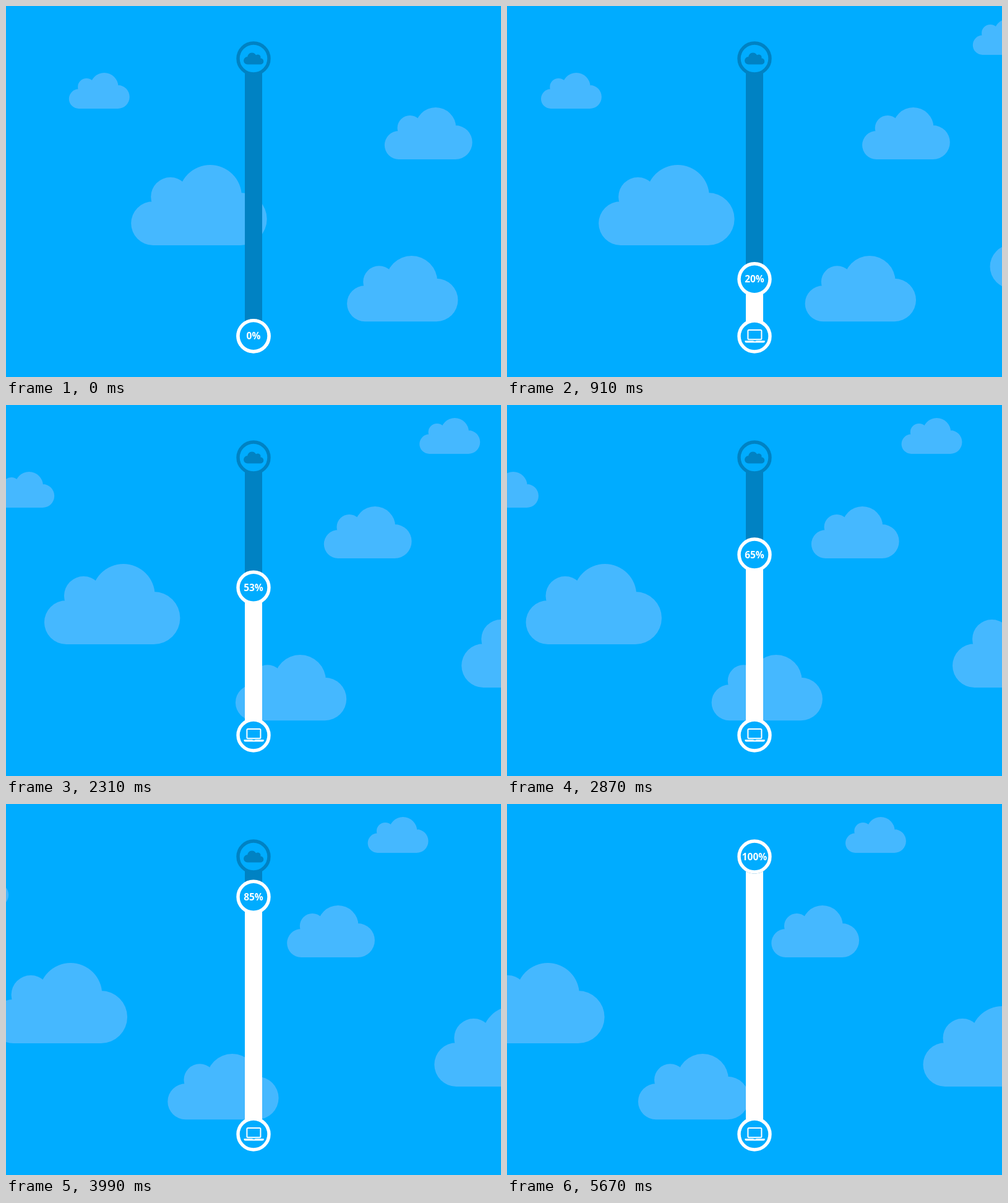
These frames come from a looping animation (800 px wide and 600 px high, 6.37 s). An HTML page with a canvas:

```html
<!DOCTYPE html>
<html lang="en">
<head>
<meta charset="utf-8">
<title>Cloud upload</title>
<style>
  html, body { margin: 0; width: 100%; height: 100%; overflow: hidden; background: #00acff; }
  canvas { display: block; }
</style>
</head>
<body>
<canvas id="stage" width="800" height="600"></canvas>
<script>
const ctx = document.getElementById('stage').getContext('2d');

const SKY = '#00acff', CLOUD = '#45b8ff', TRACK = '#0082c3', WHITE = '#fff';
const LOOP = 6370, STEP = 70, DONE = 5670, TRAVEL = 5545, LEAD = 17;
const CX = 400, TOP = 85, BOTTOM = 534, BAR = 28;
const CLOUD_W = 219.5, CLOUD_H = 130;
const SMALL = 0.446, MEDIUM = 0.646, LARGE = 0.817, HUGE = 1;

const mix = (a, b, p) => a + (b - a) * p;

// cubic-bezier(x1, 0, x2, 1), solved by bisection
function ease(x, x1 = 0.05, x2 = 0.667) {
  if (x >= 1) return 1;
  let lo = 0, hi = 1;
  for (let i = 0; i < 30; i++) {
    const s = (lo + hi) / 2, r = 1 - s;
    const bx = 3 * s * r * (x1 * r + x2 * s) + s ** 3;
    if (bx < x) lo = s; else hi = s;
  }
  return lo * lo * (3 - 2 * lo);
}

function puff(x, y, r) {
  ctx.moveTo(x + r, y);
  ctx.arc(x, y, r, 0, Math.PI * 2);
}

// The end puffs rest on the base line, the crown touches the top edge.
function cloud(x, y, scale, color, flip = 1) {
  const left = 35.5, right = 42.5, crown = 51, bump = 31.5;
  ctx.save();
  ctx.translate(x, y);
  ctx.scale(scale * flip, scale);
  ctx.beginPath();
  puff(left, CLOUD_H - left, left);
  puff(left + 28, crown + 0.5, bump);
  puff(left + 92.3, crown, crown);
  puff(CLOUD_W - right, CLOUD_H - right, right);
  ctx.rect(left, CLOUD_H / 2, CLOUD_W - left - right, CLOUD_H / 2);
  ctx.fillStyle = color;
  ctx.fill();
  ctx.restore();
}

function sky(p) {
  const drift = (from, to, y, size) => cloud(mix(from, to, p), y, size, CLOUD);
  ctx.fillStyle = SKY;
  ctx.fillRect(0, 0, 800, 600);
  drift(102, -127, 108, SMALL);
  drift(806, 547, 21, SMALL);
  drift(612, 427.3, 164, MEDIUM);
  drift(551.4, 211.9, 404, LARGE);
  drift(202.4, -61.9, 257, HUGE);
  drift(808.5, 672.5, 327, HUGE);
}

function bar(from, color) {
  ctx.fillStyle = color;
  ctx.fillRect(CX - BAR / 2, from, BAR, BOTTOM - from);
}

function ring(y, color) {
  ctx.beginPath();
  puff(CX, y, 25);
  ctx.fillStyle = SKY;
  ctx.fill();
  ctx.lineWidth = 5.4;
  ctx.strokeStyle = color;
  ctx.stroke();
}

function laptop() {
  ctx.strokeStyle = ctx.fillStyle = WHITE;
  ctx.lineWidth = 2;
  ctx.beginPath();
  ctx.roundRect(CX - 10.6, BOTTOM - 10, 22, 15.2, 1.5);
  ctx.stroke();
  ctx.beginPath();
  ctx.roundRect(CX - 15.6, BOTTOM + 7.2, 32.4, 3.3, [0.5, 0.5, 2.5, 2.5]);
  ctx.fill();
  ctx.fillStyle = SKY;
  ctx.fillRect(CX - 1.5, BOTTOM + 7.2, 4, 1);
}

function draw(t) {
  const p = ease((t + LEAD) / TRAVEL);
  const y = mix(BOTTOM, TOP, p);
  const percent = t < DONE ? Math.min(99, Math.floor(100 * p + 0.3)) : 100;

  sky(p);
  bar(TOP, TRACK);
  bar(y, WHITE);
  ring(TOP, TRACK);
  cloud(CX + 16.3, TOP - 9.5, 0.147, TRACK, -1);
  ring(BOTTOM, WHITE);
  laptop();

  ring(y, WHITE);
  ctx.font = 'bold 15.5px "Open Sans", "Noto Sans", sans-serif';
  ctx.textAlign = 'center';
  ctx.fillStyle = WHITE;
  ctx.fillText(percent + '%', CX, y + 5.7);
}

const start = performance.now();
function tick() {
  const t = (performance.now() - start) % LOOP;
  draw(Math.min(DONE, Math.floor(t / STEP) * STEP));
  requestAnimationFrame(tick);
}
tick();
</script>
</body>
</html>
```
